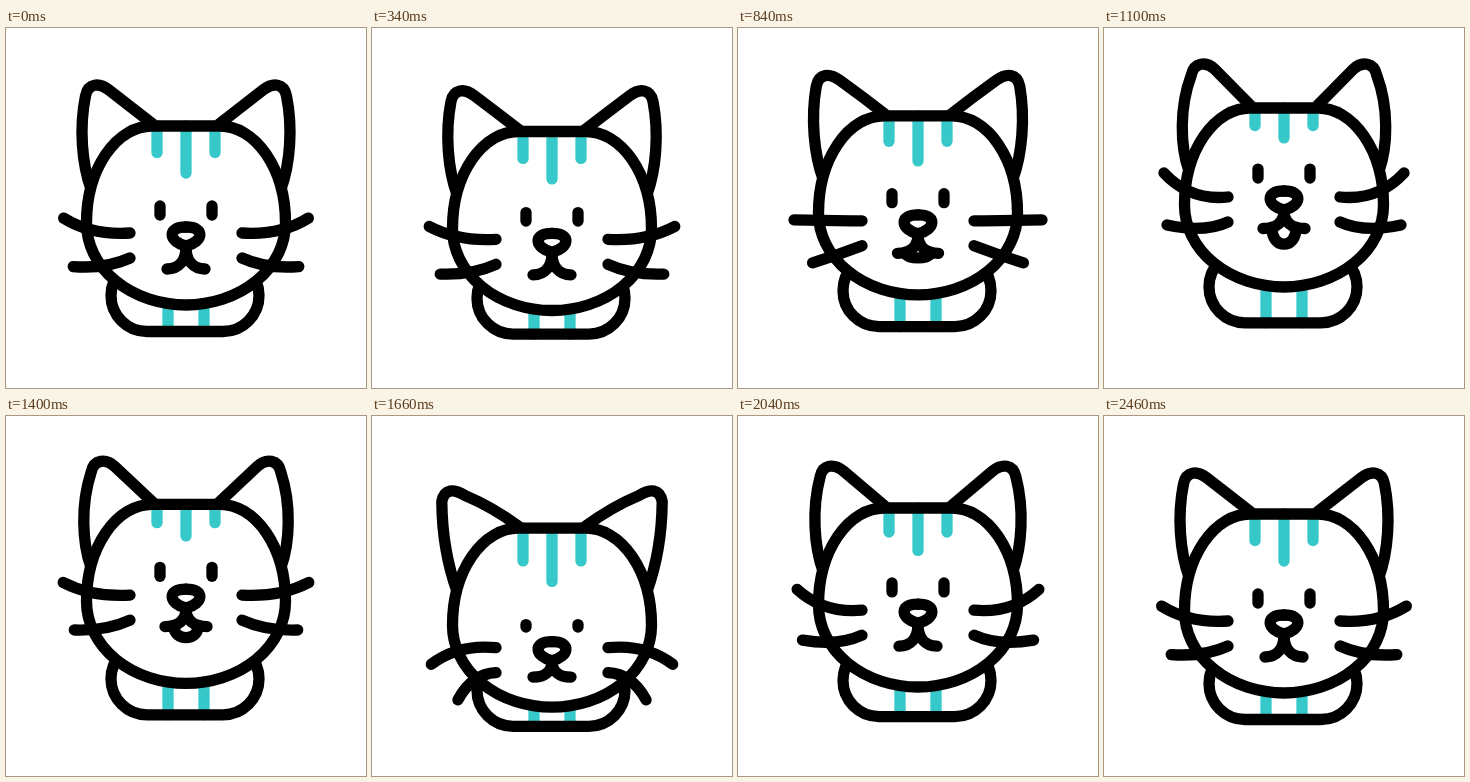
An HTML page with a canvas that plays this animation: 360x360 px, repeating every 2.6 s.

```html
<!DOCTYPE html>
<html lang="en">
<head>
<meta charset="utf-8">
<title>Nodding cat</title>
<style>
  html, body { margin: 0; width: 100%; height: 100%; overflow: hidden; background: #fff; }
  canvas { display: block; width: 100vmin; height: 100vmin; }
</style>
</head>
<body>
<canvas id="stage"></canvas>
<script>
const SIZE = 360, LOOP = 2600, STEP = 20;
const INK = '#000', TEAL = '#37c8c9', PAPER = '#fff', LINE = 11.3;
const FACE_LAG = 75, NOD = 15, REST_FLICK = 0.65;
const canvas = document.getElementById('stage');
const ctx = canvas.getContext('2d');

// The nod's beats: nod 1 is fully down, flick 1 is whiskers fully up.
const beats = [
  { at: 220, nod: 0, flick: REST_FLICK },
  { at: 500, nod: 1, flick: -1 },
  { at: 1020, nod: -1.2, flick: 1 },
  { at: 1260, nod: -1.2, flick: REST_FLICK },
  { at: 1650, nod: 0.95, flick: -1 },
  { at: 2030, nod: -0.4, flick: 1 },
  { at: 2460 - FACE_LAG, nod: 0, flick: REST_FLICK }
];

const clamp = u => Math.min(1, Math.max(0, u));
const ease = u => u < 0.5 ? 2 * u * u : 1 - 2 * (1 - u) * (1 - u);
const ramp = (t, from, to) => ease(clamp((t - from) / (to - from)));

// Sums the eased change of one part over all beats.
function level(part, t) {
  return beats.slice(1).reduce((sum, beat, i) => {
    const before = beats[i];
    return sum + (beat[part] - before[part]) * ramp(t, before.at, beat.at);
  }, beats[0][part]);
}

function stroke(trace, color = INK) {
  ctx.beginPath();
  trace();
  ctx.strokeStyle = color;
  ctx.stroke();
}

function line(x0, y0, x1, y1, color) {
  stroke(() => { ctx.moveTo(x0, y0); ctx.lineTo(x1, y1); }, color);
}

// Draws the left half's part and its mirror image.
function mirrored(draw) {
  draw();
  ctx.save();
  ctx.translate(SIZE, 0);
  ctx.scale(-1, 1);
  draw();
  ctx.restore();
}

function drawBody(bottom) {
  mirrored(() => line(162, bottom - 55, 162, bottom, TEAL));
  stroke(() => ctx.roundRect(105, bottom - 72, 148, 72, 36));
}

function drawEar(top, sway) {
  const y = top - sway * 0.35;
  const root = { x: 148, y: top - 1 }, tip = { x: 103 + sway, y: y - 36 };
  const dx = root.x - tip.x, dy = root.y - tip.y;
  const bulge = Math.max(0, -sway) * 0.45;
  stroke(() => {
    ctx.moveTo(85, top + 63);
    ctx.bezierCurveTo(76, top + 38, 73 + sway * 0.3, y + 2, 79.5 + sway, y - 30);
    ctx.bezierCurveTo(82 + sway, y - 43, tip.x - dx * 0.22, tip.y - dy * 0.22, tip.x, tip.y);
    ctx.quadraticCurveTo(tip.x + dx / 2, tip.y + dy / 2 - bulge, root.x, root.y);
  });
}

function traceHead(top) {
  const mid = top + 97, flat = 34, width = 99.5;
  const quarter = Math.PI / 2;
  ctx.ellipse(180 - flat, mid, width - flat, 97, 0, 2 * quarter, 3 * quarter);
  ctx.ellipse(180 + flat, mid, width - flat, 97, 0, 3 * quarter, 4 * quarter);
  ctx.ellipse(180, mid, width, 82, 0, 0, 2 * quarter);
  ctx.closePath();
}

function drawNose(y) {
  mirrored(() => stroke(() => {
    ctx.moveTo(180, y - 10);
    ctx.bezierCurveTo(160, y - 10, 163, y + 5, 180, y + 9);
  }));
}

function drawMouth(nose, pitch, jaw) {
  const parted = Math.min(1, jaw * 2);
  const y = nose + 32 - 0.53 * Math.max(0, pitch) - 4.5 * parted;
  const start = nose + 10;
  mirrored(() => stroke(() => {
    ctx.moveTo(180, start);
    ctx.bezierCurveTo(180, start + (y - start) * 0.6, 173, y, 161 - 2 * parted, y);
  }));
  if (jaw > 0) stroke(() => {
    ctx.moveTo(168, y);
    ctx.bezierCurveTo(168, y + 16 * jaw, 192, y + 16 * jaw, 192, y);
  });
}

function drawWhiskers(nose, flick) {
  const bend = flick * flick;
  const hair = (y, cx, cy, dx, dy) => stroke(() => {
    ctx.moveTo(124, y);
    ctx.quadraticCurveTo(124 + cx, y + cy, 124 + dx, y + dy);
  });
  hair(nose - 4, -38, 4 * flick, -68 + 4 * bend, -21 * flick - 3 * bend);
  hair(nose + 21, -24, 9 + 5.5 * flick - 3.5 * bend, -49 - 12 * flick, 17.5 - 12.5 * flick - 2 * bend);
}

function drawCat(t) {
  const nod = level('nod', t);
  const faceNod = level('nod', t - FACE_LAG);
  const flick = level('flick', t - FACE_LAG);
  const jaw = 1.3 * (ramp(t, 740, 1000) - ramp(t, 1300, 1560));
  const sway = 3.3 * (flick - REST_FLICK) - 5.5 * faceNod;
  const pitch = NOD * faceNod, down = Math.max(0, pitch);
  const top = 98 + NOD * nod;
  const nose = top + 111 + pitch;
  const eye = top + 84.5 + pitch * 1.05;
  const eyeHalf = 4.5 - down * 0.26;

  drawBody(303.5 + NOD * nod * 0.48);
  mirrored(() => drawEar(top, sway));
  ctx.beginPath();
  traceHead(top);
  ctx.fillStyle = PAPER;
  ctx.fill();

  mirrored(() => line(151, top, 151, top + 26.5 + pitch * 0.5, TEAL));
  line(180, top, 180, top + 47 + pitch * 0.95 - down * 0.45, TEAL);
  stroke(() => traceHead(top));

  mirrored(() => {
    line(154, eye - eyeHalf, 154, eye + eyeHalf);
    drawWhiskers(nose, flick);
  });
  drawMouth(nose, pitch, jaw);
  drawNose(nose);
}

function render(now) {
  const side = Math.round(Math.min(innerWidth, innerHeight) * devicePixelRatio) || SIZE;
  if (canvas.width !== side) canvas.width = canvas.height = side;
  ctx.setTransform(side / SIZE, 0, 0, side / SIZE, 0, 0);
  ctx.lineWidth = LINE;
  ctx.lineCap = ctx.lineJoin = 'round';
  ctx.fillStyle = PAPER;
  ctx.fillRect(0, 0, SIZE, SIZE);
  drawCat(Math.floor((now % LOOP) / STEP) * STEP);
}

const origin = performance.now();
function tick() {
  render(performance.now() - origin);
  requestAnimationFrame(tick);
}
tick();
</script>
</body>
</html>
```
